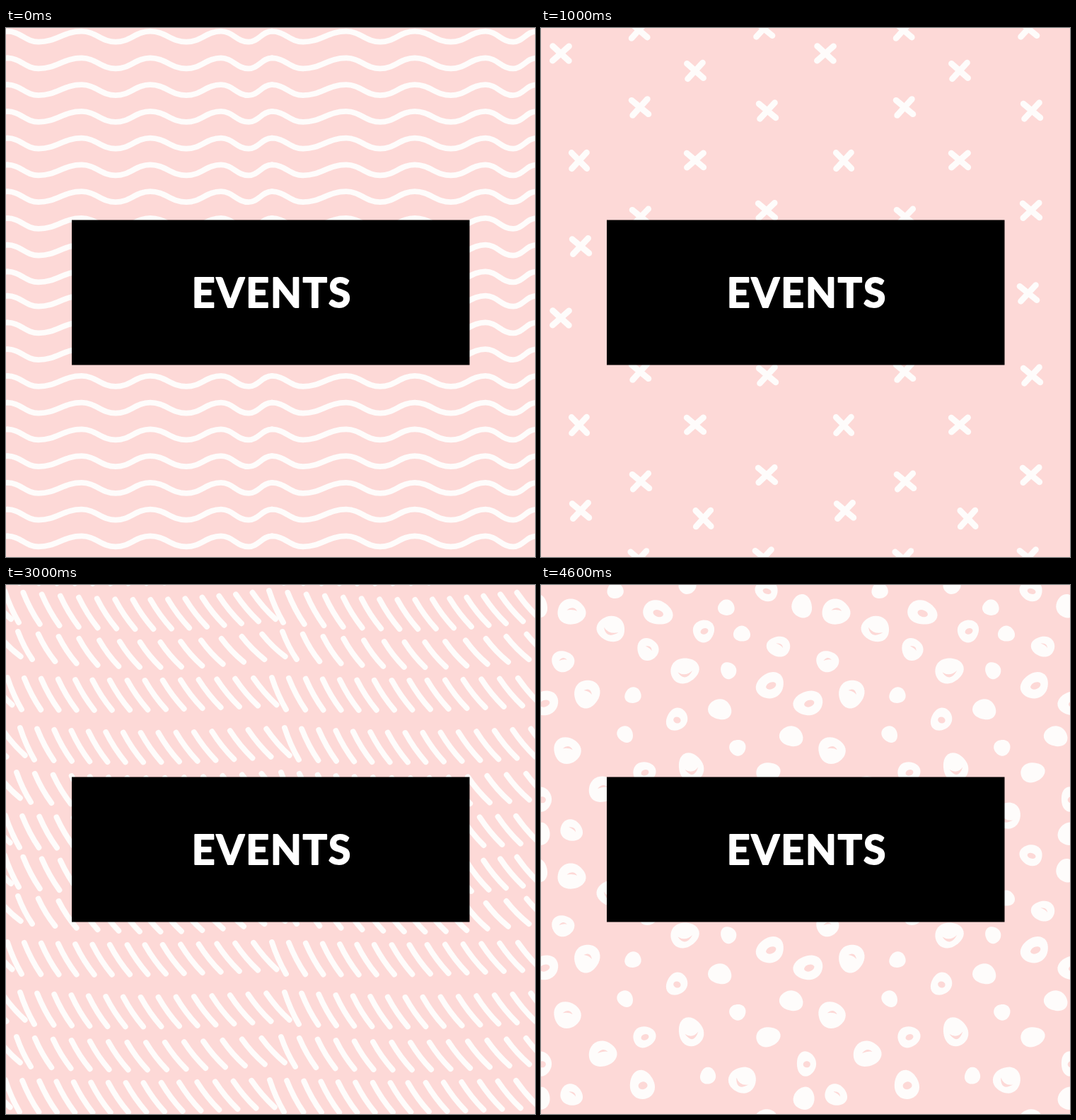
Recreate the animation shown at these times as an HTML page with a canvas. Size 748 by 748 pixels, loop 5000 ms.

```html
<!DOCTYPE html>
<html lang="en">
<head>
<meta charset="utf-8">
<title>Events</title>
<style>
  html, body { margin: 0; width: 100%; height: 100%; overflow: hidden; background: #fdd9d7; }
  canvas, svg { position: absolute; left: 0; top: 0; display: block; }
  text {
    font: 700 57px Lato, "Open Sans", sans-serif;
    letter-spacing: 2px;
    text-anchor: middle;
    fill: #fff; stroke: #fff; stroke-width: 2; stroke-linejoin: round;
  }
</style>
</head>
<body>
<canvas id="pattern" width="748" height="748"></canvas>
<svg width="748" height="748" viewBox="0 0 748 748">
  <rect x="93" y="271.5" width="562.5" height="205"/>
  <text x="376" y="394.5">EVENTS</text>
</svg>
<script>
const SIZE = 748, TILE = 374, HOLD = 1000;
const PINK = '#fdd9d7', WHITE = '#fefcfb';
const ctx = document.getElementById('pattern').getContext('2d');

// Repeatable jitter between -1 and 1
const jitter = seed => Math.sin(seed * 12.9898 + Math.sin(seed * 78.233) * 3);

function line(x1, y1, x2, y2) {
  ctx.beginPath();
  ctx.moveTo(x1, y1);
  ctx.lineTo(x2, y2);
  ctx.stroke();
}

// Turning points alternate between crest and trough
function waves() {
  const turns = [2, 46, 107, 155, 204, 255, 304, 343, 376];
  ctx.lineWidth = 7.8;
  for (let row = 0; row < 10; row++) {
    const top = 4.7 + row * 37.75;
    ctx.beginPath();
    turns.forEach((x, i) => {
      const y = top + (i % 2) * 15;
      if (!i) return ctx.moveTo(x, y);
      const px = turns[i - 1], py = top + ((i - 1) % 2) * 15, k = (x - px) * 0.42;
      ctx.bezierCurveTo(px + k, py, x - k, y, x, y);
    });
    ctx.stroke();
  }
}

function crosses() {
  const centres = [
    [28, 36], [54, 187.5], [56, 308.5], [138.5, 377], [140, 112], [141, 267],
    [218, 60.5], [218, 187], [229.5, 319.5], [315, 375], [320, 117], [319, 258]
  ];
  ctx.lineWidth = 8.6;
  centres.forEach(([x, y], i) => {
    [0.74, -0.78].forEach((slope, arm) => {
      const a = slope + 0.06 * jitter(i + arm);
      const dx = 15.5 * Math.cos(a), dy = 15.5 * Math.sin(a);
      line(x - dx, y - dy, x + dx, y + dy);
    });
  });
}

// Centre, width and height; every box leans the same way
function boxes() {
  const list = [
    [86, 88, 30, 26], [261, 83, 27, 35], [184, 179, 29, 32], [373, 178, 36, 34],
    [84, 279, 32, 31], [278, 281, 32, 37], [377, 377, 26, 28], [182, 372, 26, 24]
  ];
  ctx.lineWidth = 7.6;
  for (const [x, y, w, h] of list) {
    const l = x - w / 2, r = x + w / 2, t = y - h / 2, b = y + h / 2;
    ctx.beginPath();
    ctx.moveTo(l - 2, t + 1);
    ctx.lineTo(r - 2, t - 1);
    ctx.lineTo(r + 1, b - 1);
    ctx.lineTo(l + 4, b + 1);
    ctx.lineTo(l, t + 1);
    ctx.stroke();
  }
}

// Strokes lean over along each row; sparser rows have shorter strokes
function hatch() {
  const rows = [ // count, left, top, bow along x, sag along y
    [15, -2, 8, 7, 13], [13, 17, 66, 0, 15], [15, 2, 131, -5, 4],
    [15, 20, 202, -4, 7], [14, 15, 265, -4, 8], [15, -1, 326, -4, 4]
  ];
  ctx.lineWidth = 7.8;
  for (const [n, left, top, bow, sag] of rows) {
    for (let i = 0; i < n; i++) {
      const t = i / n, arch = Math.sin(Math.PI * t);
      const x = left + TILE * t + bow * arch, y = top + sag * arch;
      const dx = 20 + 13 * Math.sqrt(t), dy = 3 * n - 8 * t;
      ctx.beginPath();
      ctx.moveTo(x, y);
      ctx.quadraticCurveTo(x + dx / 2 - 2, y + dy / 2 + 2, x + dx, y + dy);
      ctx.stroke();
    }
  }
}

// Openings inside a blob, in units of its radius
const cuts = {
  none() {},
  hole() {
    ctx.ellipse(0.05, 0.05, 0.36, 0.27, 0, 0, 7);
  },
  crescent() {
    ctx.moveTo(-0.5, 0);
    ctx.quadraticCurveTo(-0.15, 0.95, 0.55, 0.15);
    ctx.quadraticCurveTo(-0.05, 0.5, -0.5, 0);
  },
  slit() {
    ctx.moveTo(-0.3, -0.2);
    ctx.quadraticCurveTo(0.2, -0.5, 0.4, 0);
    ctx.quadraticCurveTo(0.15, -0.2, -0.3, -0.2);
  }
};

function blob(x, y, size, cut) {
  const stretch = 1 + 0.09 * jitter(x);
  ctx.save();
  ctx.translate(x, y);
  ctx.rotate(0.4 * jitter(y));
  ctx.scale(size * stretch, size / stretch);
  ctx.beginPath();
  for (let i = 0; i < 36; i++) {
    const a = i * Math.PI / 18;
    const r = 1 + 0.04 * Math.sin(2 * a + x) + 0.035 * Math.sin(3 * a + y);
    ctx.lineTo(r * Math.cos(a), r * Math.sin(a));
  }
  ctx.fillStyle = WHITE;
  ctx.fill();
  ctx.beginPath();
  cuts[cut]();
  ctx.fillStyle = PINK;
  ctx.fill();
  ctx.restore();
}

const groups = [
  {
    size: 19, cuts: ['slit', 'crescent', 'hole'],
    at: [[43, 38], [99, 62], [165, 39], [65, 154], [203, 121], [324, 142],
         [37, 234], [212, 258], [378, 167], [87, 289], [285, 326], [143, 333]]
  },
  {
    size: 15.5, cuts: ['hole', 'none', 'slit'],
    at: [[192, 190], [253, 176], [336, 87], [319, 382], [321, 265], [31, 108], [230, 65],
         [369, 30], [151, 91], [375, 303], [372, 352], [43, 347], [146, 265], [354, 214]]
  },
  {
    size: 11.5, cuts: ['none'],
    at: [[105, 8], [262, 32], [284, 69], [265, 121], [130, 156], [119, 211], [278, 230], [236, 320], [207, 2]]
  }
];

function blobs() {
  for (const { size, cuts: kinds, at } of groups) {
    at.forEach(([x, y], i) => blob(x, y, size, kinds[i % kinds.length]));
  }
}

const scenes = [waves, crosses, boxes, hatch, blobs];

function paint(scene) {
  ctx.fillStyle = PINK;
  ctx.fillRect(0, 0, SIZE, SIZE);
  ctx.strokeStyle = WHITE;
  ctx.lineCap = ctx.lineJoin = 'round';
  for (let x = -TILE; x < SIZE; x += TILE) {
    for (let y = -TILE; y < SIZE; y += TILE) {
      ctx.save();
      ctx.translate(x, y);
      scene();
      ctx.restore();
    }
  }
}

const start = performance.now();
let shown = -1;

function tick() {
  const now = Math.floor((performance.now() - start) / HOLD) % scenes.length;
  if (now !== shown) paint(scenes[shown = now]);
  requestAnimationFrame(tick);
}
tick();
</script>
</body>
</html>
```
